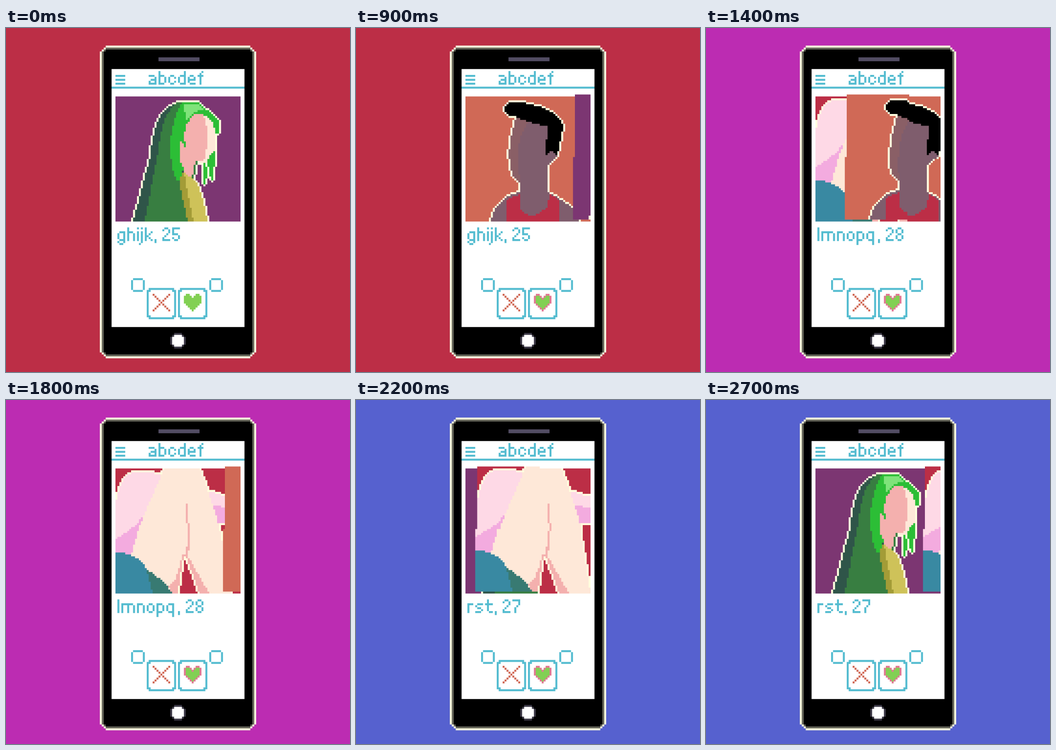
Recreate the animation shown at these times as an HTML page with a canvas. Size 748 px wide and 748 px high, loop 2800 ms.

```html
<!DOCTYPE html>
<html lang="en">
<head>
<meta charset="utf-8">
<title>Swipe</title>
<style>
html, body { margin: 0; width: 100%; height: 100%; overflow: hidden; }
canvas { display: block; width: 100vw; height: 100vh; }
</style>
</head>
<body>
<canvas id="stage" role="img" aria-label="abcdef: swiping through cards"></canvas>
<script>
const GRID = 176, ZOOM = 5, STAGE = 748, LOOP = 2800;
const SIZE = 64, HALF = SIZE / 2, CARD_X = 56, CARD_Y = 35;
const CYAN = '#54bcd0', CREAM = '#ffffdf', RED = '#bc2e46', ORANGE = '#d06956',
  PEACH = '#fee8d8', ROSE = '#f4b0ae', GREEN = '#82d053', GREY = '#66665a', DARK = '#3b3846';

function surface(size, canvas = document.createElement('canvas')) {
  canvas.width = canvas.height = size;
  return canvas.getContext('2d');
}

const ctx = surface(GRID);
const zoomed = surface(GRID * ZOOM);
const stage = surface(STAGE, document.getElementById('stage'));
zoomed.imageSmoothingEnabled = false;

function rect(color, x, y, w, h) {
  ctx.fillStyle = color;
  ctx.fillRect(x, y, w, h);
}

// Box outline with cut corners.
function frame(color, x, y, w, h, cut = 1) {
  rect(color, x + cut, y, w - 2 * cut, 1);
  rect(color, x + cut, y + h - 1, w - 2 * cut, 1);
  rect(color, x, y + cut, 1, h - 2 * cut);
  rect(color, x + w - 1, y + cut, 1, h - 2 * cut);
}

function corners(color, x, y, w, h) {
  for (const cx of [x, x + w - 1]) for (const cy of [y, y + h - 1]) rect(color, cx, cy, 1, 1);
}

function line(color, x0, y0, x1, y1) {
  const n = Math.max(Math.abs(x1 - x0), Math.abs(y1 - y0));
  for (let i = 0; i <= n; i++)
    rect(color, Math.round(x0 + (x1 - x0) * i / n), Math.round(y0 + (y1 - y0) * i / n), 1, 1);
}

// Pixel lettering, built from a few shared parts.
const TOP = 2, BASE = 6;
const dot = (x, y) => rect(CYAN, x, y, 1, 1);
const bar = (x, y, w) => rect(CYAN, x, y, w, 1);
const stem = (x, y, h) => rect(CYAN, x, y, 1, h);
const slash = (...ends) => line(CYAN, ...ends);
const bowl = () => frame(CYAN, 0, TOP, 4, 5);
const arch = x => { stem(x, TOP, 5); bar(x, TOP, 3); stem(x + 3, TOP + 1, 4); };
const hook = () => { bar(1, TOP, 2); stem(0, TOP + 1, 3); };

// Each letter: width and drawing.
const GLYPHS = {
  a: [4, () => { bar(0, TOP, 3); stem(3, 3, 4); bar(1, 4, 2); dot(0, 5); bar(0, BASE, 3); }],
  b: [4, () => { bowl(); stem(0, 0, 7); }],
  c: [4, () => { hook(); dot(3, 3); dot(3, 5); bar(1, BASE, 2); }],
  d: [4, () => { bowl(); stem(3, 0, 7); }],
  e: [4, () => { hook(); dot(3, 3); bar(0, 4, 4); bar(1, BASE, 3); }],
  f: [3, () => { stem(1, 1, 6); dot(2, 0); bar(0, TOP, 3); }],
  g: [4, () => { bowl(); stem(3, TOP, 6); dot(0, 7); bar(1, 8, 2); }],
  h: [4, () => { arch(0); stem(0, 0, 7); }],
  i: [1, () => { dot(0, 0); stem(0, TOP, 5); }],
  j: [1, () => { dot(0, 0); stem(0, TOP, 6); dot(-1, 8); }],
  k: [4, () => { stem(0, 0, 7); slash(3, TOP, 1, 4); slash(1, 4, 3, BASE); }],
  l: [1, () => stem(0, 0, 7)],
  m: [7, () => { arch(0); arch(3); }],
  n: [4, () => arch(0)],
  o: [4, bowl],
  p: [4, () => { bowl(); stem(0, TOP, 7); }],
  q: [5, () => { bowl(); stem(3, TOP, 7); }],
  r: [3, () => { stem(0, TOP, 5); bar(1, TOP, 2); }],
  s: [4, () => { bar(1, TOP, 3); dot(0, 3); bar(1, 4, 2); dot(3, 5); bar(0, BASE, 3); }],
  t: [4, () => { stem(1, 0, 6); bar(0, TOP, 4); bar(2, BASE, 2); }],
  ',': [1, () => stem(0, BASE, 2)],
  ' ': [1, () => {}],
  2: [4, () => { dot(0, 1); bar(1, 0, 2); stem(3, 1, 2); slash(3, 2, 0, 5); bar(0, BASE, 4); }],
  5: [4, () => { bar(0, 0, 4); stem(0, 0, 3); bar(0, 3, 3); stem(3, 4, 2); dot(0, 5); bar(1, BASE, 2); }],
  7: [4, () => { bar(0, 0, 4); stem(3, 0, 3); slash(3, 2, 1, 4); stem(1, 4, 3); }],
  8: [4, () => { frame(CYAN, 0, 0, 4, 4); frame(CYAN, 0, 3, 4, 4); }]
};

function text(str, x, y) {
  ctx.save();
  ctx.translate(x, y);
  for (const ch of str) {
    const [width, paint] = GLYPHS[ch];
    paint();
    ctx.translate(width + 1, 0);
  }
  ctx.restore();
}

// Visits every cell of a card.
function eachCell(visit) {
  for (let y = 0; y < SIZE; y++) for (let x = 0; x < SIZE; x++) visit(x, y);
}

// Rasterises curved shapes to cells and rims the whole silhouette in cream.
function makeCard(bg, shapes) {
  const g = surface(SIZE);
  const cells = Array.from({ length: SIZE }, () => Array(SIZE).fill(bg));
  for (const [color, d] of shapes) {
    const path = new Path2D(d);
    eachCell((x, y) => {
      if (g.isPointInPath(path, x + 0.5, y + 0.5)) cells[y][x] = color;
    });
  }
  const solid = (x, y) => (cells[y]?.[x] ?? bg) !== bg;
  eachCell((x, y) => {
    const rim = !solid(x, y) &&
      (solid(x - 1, y) || solid(x + 1, y) || solid(x, y - 1) || solid(x, y + 1));
    g.fillStyle = rim ? CREAM : cells[y][x];
    g.fillRect(x, y, 1, 1);
  });
  return g.canvas;
}

const LEAF = '#387e41', LIME = '#2cbe36', PINK = '#fed9e6', ORCHID = '#f3abdf';

const hooded = makeCard('#7c3672', [
  ['#2f5549', 'M9 64L18 30Q20 4 34 3H40L36 40L40 64Z'],
  [LEAF, 'M15 64L22 27Q24 8 32 3H38L33 42L38 64Z'],
  [LIME, 'M34 3H42L53 12V19H51V16L44 12Q34 20 35 36L33 43H31Q24 22 34 3Z'],
  ['#7fe37a', 'M35 4H42L45 7Q39 7 37 12H36Z'],
  [PEACH, 'M44 9Q51 11 51 20V28L47 34H43Z'],
  [ROSE, 'M41 9H45Q49 22 45 33H42L40 42H37L33 33V23H35Q35 13 41 9Z'],
  [LIME, 'M34 23H36V26H35V24H34Z'],
  [LEAF, 'M41 33H42L40 42H39Z'],
  [LIME, 'M45 34H46L47 39L46 45H45Z'],
  [LIME, 'M50 28H51L50 43H49L47 33Z'],
  ['#cec259', 'M35 39L41 43Q45 50 47 64H37Z'],
  ['#a39c37', 'M35 38L36 45L40 64H37L33 46V42Z']
]);

const quiffed = makeCard(ORANGE, [
  ['#7f5d6d', 'M26 11Q20 28 24 40L28 44V49Q15 52 13 64H58Q57 56 41.5 49V36L47 30V11Z'],
  ['#8a5f66', 'M26 11H33Q25 24 27 37L28 44L24 40Q20 28 26 11Z'],
  [RED, 'M21 53L28 50V57Q34 65 42 56L43 50L48 53V64H21Z'],
  ['#000', 'M20 7Q20 3 24 3H28Q48 6 50 16L47 30L44 27L41 30L42 15Q33 14 26 10.5Q21 10 20 7Z']
]);

const draped = makeCard(RED, [
  [PINK, 'M0 18Q3 2 10 2H18L24 4L25 30L0 40Z'],
  [ORCHID, 'M0 36Q10 31 15 23H18V46H0Z'],
  [PINK, 'M46 12H50L55 14H64V28H46Z'],
  [ORCHID, 'M46 18L56 20H64V28H46Z'],
  [PEACH, 'M25 0H43Q52 22 55 40L59 64H8V45Q12 28 19 14Z'],
  ['#3989a2', 'M0 43Q18 43 19 64H0Z'],
  ['#387a72', 'M16 52Q24 56 29 64H19Z'],
  [ROSE, 'M36 18H37V28H38V40L37 44H36V40H37V28H36Z'],
  [ROSE, 'M34 44H36L32 64H29L27 60Q32 58 34 44Z'],
  [ROSE, 'M36 43L48 64H43L35 45Z'],
  [RED, 'M35 45H36L43 64H32L34 50Z']
]);

const SCENES = [
  { start: 0, slide: 400, bg: RED, card: hooded, label: 'ghijk, 25' },
  { start: 1000, slide: 1300, bg: '#bc2cb2', card: quiffed, label: 'lmnopq, 28' },
  { start: 1900, slide: 2200, bg: '#5661cf', card: draped, label: 'rst, 27' }
];

function phone() {
  rect('#000', 50, 11, 76, 156);
  frame(CREAM, 48, 9, 80, 160, 3);
  frame(GREY, 49, 10, 78, 158, 2);
  corners(CREAM, 50, 10, 76, 158);
  corners(CREAM, 49, 11, 78, 156);
  corners(GREY, 50, 11, 76, 156);
  rect('#524c63', 78, 15, 21, 2);
  rect('#fff', 54, 21, 68, 132);
  rect(CYAN, 54, 30, 68, 1);
  for (const y of [24, 26, 28]) rect(CYAN, 56, y, 5, 1);
  rect(DARK, 86, 156, 4, 8);
  rect(DARK, 84, 158, 8, 4);
  rect(DARK, 85, 157, 6, 6);
  rect('#fff', 86, 157, 4, 6);
  rect('#fff', 85, 158, 6, 4);
}

function inHeart(x, y) {
  const d = Math.abs(x - 4);
  if (y < 0 || y > 8) return false;
  if (y === 0) return d === 2 || d === 3;
  if (y === 1) return d > 0 && d < 5;
  return d <= Math.min(4, 8 - y);
}

function heart(x0, y0, rim) {
  for (let y = 0; y < 9; y++) for (let x = 0; x < 9; x++) {
    if (!inHeart(x, y)) continue;
    const core = inHeart(x - 1, y) && inHeart(x + 1, y) && inHeart(x, y - 1) && inHeart(x, y + 1);
    rect(core ? GREEN : rim, x0 + x, y0 + y, 1, 1);
  }
}

function controls(rim) {
  for (const x of [64, 104]) frame(CYAN, x, 128, 7, 7);
  for (const x of [72, 88]) {
    frame(CYAN, x, 133, 15, 16);
    corners(CYAN, x + 1, 134, 13, 14);
  }
  line(ORANGE, 75, 136, 83, 144);
  line(ORANGE, 83, 136, 75, 144);
  heart(91, 136, rim);
}

// The sliding card tilts: its left half rises and its lower half lags by one cell.
function tilted(card, off) {
  ctx.save();
  ctx.beginPath();
  ctx.rect(CARD_X, CARD_Y - 1, SIZE, SIZE + 1);
  ctx.clip();
  for (const sy of [0, HALF]) for (const sx of [0, HALF]) {
    const x = CARD_X + sx + off - (sy ? 1 : 0), y = CARD_Y + sy - (sx ? 0 : 1);
    const h = sy ? HALF : HALF + 1; // overlap hides the seam
    ctx.drawImage(card, sx, sy, HALF, h, x, y, HALF, h);
  }
  ctx.restore();
}

function draw(t) {
  const n = SCENES.findLastIndex(s => t >= s.start);
  const scene = SCENES[n], next = SCENES[(n + 1) % SCENES.length];
  const tapped = t >= scene.start + 300;
  const rim = !tapped ? GREEN : t < 900 ? '#c2519c' : '#e07a92';

  rect(scene.bg, 0, 0, GRID, GRID);
  phone();
  text('abcdef', 73, 22);
  text(scene.label, 57, 102);
  controls(rim);
  if (t < scene.slide) {
    ctx.drawImage(scene.card, CARD_X, CARD_Y);
  } else {
    ctx.drawImage(next.card, CARD_X, CARD_Y);
    tilted(scene.card, 6 + 10 * Math.floor((t - scene.slide) / 100));
  }

  // Enlarge hard-edged, then settle softly onto the stage.
  zoomed.drawImage(ctx.canvas, 0, 0, GRID * ZOOM, GRID * ZOOM);
  stage.drawImage(zoomed.canvas, 0, 0, STAGE, STAGE);
}

const began = performance.now();
function tick() {
  draw((performance.now() - began) % LOOP);
  requestAnimationFrame(tick);
}
tick();
</script>
</body>
</html>
```
